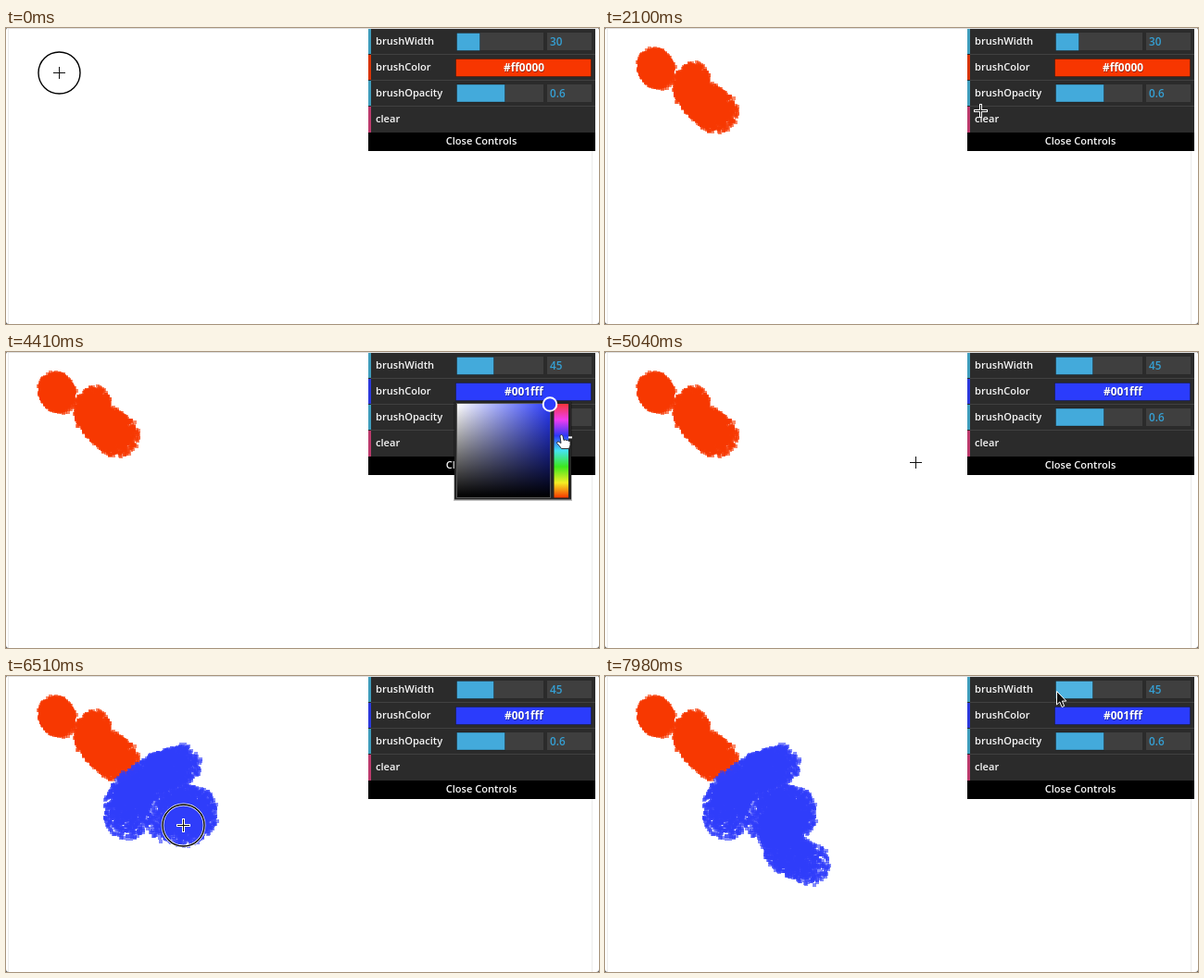
These frames come from a looping animation (640 px wide and 320 px high, 8 s). An HTML page with a canvas:

```html
<!DOCTYPE html>
<html lang="en">
<head>
<meta charset="utf-8">
<title>Brush controls</title>
<style>
html, body { margin: 0; width: 100%; height: 100%; overflow: hidden; background: #fff; }
canvas, svg { position: absolute; left: 0; top: 0; width: 640px; height: 320px; }
text { font-family: "Open Sans", "Noto Sans", sans-serif; font-weight: 600; }
.label { font-size: 11.1px; fill: #f6f6f6; }
.num { font-size: 11.7px; fill: #35a0d4; }
.hex { font-size: 11.9px; font-weight: 700; fill: #fff; text-anchor: middle; }
.rim { stroke: #000; stroke-opacity: .3; }
</style>
</head>
<body>
<canvas id="paint" width="640" height="320"></canvas>
<svg viewBox="0 0 640 320">
  <defs>
    <linearGradient id="sat">
      <stop stop-color="#fff"/><stop id="satEnd" offset="1"/>
    </linearGradient>
    <linearGradient id="dark" x2="0" y2="1">
      <stop stop-color="#000" stop-opacity="0"/><stop offset="1"/>
    </linearGradient>
    <linearGradient id="hues" x2="0" y2="1">
      <stop stop-color="#f5363a"/><stop offset=".17" stop-color="#f03cf0"/>
      <stop offset=".34" stop-color="#2d38f8"/><stop offset=".5" stop-color="#45e4f0"/>
      <stop offset=".67" stop-color="#3ce81e"/><stop offset=".84" stop-color="#f4ee24"/>
      <stop offset="1" stop-color="#f63800"/>
    </linearGradient>
  </defs>

  <g fill="none" stroke="#ececec">
    <path d="M2.5 1V320M632.5 1V320"/>
    <path d="M2 .5H638" stroke="#dedede"/>
  </g>
  <path d="M0 317Q0 320 3 320H0ZM640 317Q640 320 637 320H640ZM0 2Q0 0 2 0H0ZM640 2Q640 0 638 0H640Z" fill="#555"/>

  <g id="panel">
    <rect x="391" y="1" width="245" height="112" fill="#2b2b2b"/>
    <path d="M394 28.5H636M394 56.5H636M394 84.5H636" stroke="#414141"/>
    <rect x="391" y="113" width="245" height="20" fill="#000"/>
    <g opacity=".85">
      <rect x="391" y="1" width="3" height="27" fill="#43b1d6"/>
      <rect id="edge" x="391" y="29" width="3" height="27"/>
      <rect x="391" y="57" width="3" height="27" fill="#43b1d6"/>
      <rect x="391" y="85" width="3" height="28" fill="#d63d78"/>
    </g>
    <g class="label">
      <text x="399" y="18">brushWidth</text>
      <text x="399" y="46">brushColor</text>
      <text x="399" y="74">brushOpacity</text>
      <text x="399" y="102">clear</text>
      <text x="513" y="126" text-anchor="middle">Close Controls</text>
    </g>
    <path d="M487 5h93v19h-93ZM584 5h48v19h-48ZM487 61h93v19h-93ZM584 61h48v19h-48Z" fill="#3f3f3f"/>
    <rect id="widthFill" class="rim" x="486.5" y="5.5" height="19"/>
    <rect class="rim" x="486.5" y="61" width="52" height="19" fill="#43aadb"/>
    <text id="widthNum" class="num" x="587" y="19"></text>
    <text class="num" x="587" y="75">0.6</text>
    <rect id="swatch" class="rim" x="485.5" y="33.5" width="146" height="19"/>
    <text id="hexShade" class="hex" x="559.5" y="47.6" style="fill:#000" opacity=".4"></text>
    <text id="hex" class="hex" x="559" y="47"></text>
  </g>

  <g id="picker">
    <rect x="483" y="54" width="128" height="107" fill="#000" opacity=".25"/>
    <rect x="484" y="53" width="126" height="106.5" fill="#252525"/>
    <rect x="486" y="55" width="102" height="103" fill="#555"/>
    <rect x="487" y="56" width="100" height="101" fill="url(#sat)"/>
    <rect x="487" y="56" width="100" height="101" fill="url(#dark)"/>
    <rect x="591.5" y="56" width="15.5" height="101.5" fill="url(#hues)"/>
    <rect id="mark" x="607" width="4" height="2" fill="#fff"/>
    <circle id="knob" cx="587" cy="56.5" r="7.3" stroke="#fff" stroke-width="2"/>
  </g>

  <g id="pointer">
    <g id="ring" fill="none">
      <circle r="22.5" stroke="#fff" stroke-width="2.8"/>
      <circle r="22.5" stroke="#000" stroke-width="1.4"/>
    </g>
    <g id="cross">
      <path d="M-7.5 0H7.5M0 -7.5V7.5" stroke="#fff" stroke-width="3"/>
      <path d="M-6.5 0H6.5M0 -6.5V6.5" stroke="#111"/>
    </g>
    <g id="ibeam" fill="none">
      <path d="M-4 -8Q0 -8 0 -5V5Q0 8 -4 8M4 -8Q0 -8 0 -5V5Q0 8 4 8M-2 3H2" stroke="#fff" stroke-width="3"/>
      <path d="M-3.5 -8Q0 -8 0 -5V5Q0 8 -3.5 8M3.5 -8Q0 -8 0 -5V5Q0 8 3.5 8M-2 3H2" stroke="#222"/>
    </g>
    <path id="arrow" d="M0 0V14.5L3.3 11.5L5.6 17L8.2 16L5.9 10.6H10.3Z" fill="#111" stroke="#fff"/>
    <path id="hand" d="M-1.6 -2Q0 -4 1.4 -2L2.5 3Q4 1.6 5 3Q6.5 2 7.3 3.7Q9 3 9.5 5V8Q9 10 8 12H0Q-2 9 -5 6Q-5 4 -3 4.5L-.5 6Z" fill="#fff" stroke="#222" stroke-width=".9"/>
  </g>
</svg>
<script>
const LOOP = 8000, STEP = 70;
const UP = 0, RED = 1, BLUE = 2, IDLE = 3;
const INK = { [RED]: "#f73700", [BLUE]: "#2f3dfb" };
const $ = id => document.getElementById(id);
const ctx = $("paint").getContext("2d");

// Pointer path: time, x, y, button state until the next entry, spray radius
const path = [
  [0, 57, 48, RED, 18], [210, 53, 39, RED, 18], [350, 55, 45, RED, 19], [420, 60, 49, IDLE, 18],
  [490, 95, 54, RED, 18], [700, 93, 70, RED, 19], [880, 108, 81, RED, 22], [1150, 122, 92, UP, 23],
  [1400, 124, 94, UP], [2100, 405, 89, UP], [2380, 511, 16, UP], [2450, 511, 16, UP],
  [2700, 526, 16, UP], [2800, 545, 43, UP], [3290, 558, 66, UP], [3640, 599, 106, UP],
  [3710, 599, 106, UP], [4200, 599, 92, UP], [4480, 599, 92, UP], [4700, 480, 78, UP],
  [5040, 335, 119, UP], [5320, 191, 95, BLUE, 21], [5560, 165, 104, BLUE, 21], [5700, 138, 124, BLUE, 23],
  [5850, 129, 144, IDLE, 25], [5950, 138, 156, IDLE], [6020, 131, 151, BLUE, 25], [6090, 132, 153, IDLE, 25],
  [6180, 176, 158, BLUE, 24], [6300, 190, 141, BLUE, 25], [6400, 206, 146, BLUE, 25], [6480, 198, 158, BLUE, 25],
  [6530, 187, 164, BLUE, 23], [6580, 194, 190, BLUE, 23], [6660, 225, 205, UP, 22], [6720, 225, 205, UP],
  [7000, 572, 43, UP], [7300, 572, 43, UP], [7840, 487, 16, UP], [8000, 487, 16, UP]
];
const shapes = [
  [0, "cross"], [2150, "arrow"], [2780, "ibeam"], [2950, "hand"],
  [4620, "cross"], [6950, "ibeam"], [7350, "arrow"]
];

const clamp = v => Math.min(1, Math.max(0, v));
const mix = (a, b, k) => a + (b - a) * k;
const during = (t, a, b) => clamp((t - a) / (b - a));
const smooth = k => k * k * (3 - 2 * k);
const lastBefore = (list, t) => list.reduce((best, item) => item[0] <= t ? item : best);

function random(seed) {
  return () => {
    seed = (seed * 1664525 + 1013904223) >>> 0;
    return seed / 4294967296;
  };
}

// Every stroke is a spray of small translucent squares
function makeDots() {
  const rnd = random(71), dots = [];
  for (let i = 0; i < path.length - 1; i++) {
    const [t, x, y, ink, r1] = path[i], [t2, x2, y2, , r2] = path[i + 1];
    if (!INK[ink]) continue;
    const count = 18 * Math.hypot(x2 - x, y2 - y) + 4 * (t2 - t);
    for (let n = 0; n < count; n++) {
      const k = n / count, a = rnd() * Math.PI * 2, r = mix(r1, r2, k) * Math.sqrt(rnd());
      dots.push({
        t: mix(t, t2, k), ink,
        x: Math.round(mix(x, x2, k) + r * Math.cos(a)) - 2,
        y: Math.round(mix(y, y2, k) + r * Math.sin(a)) - 2
      });
    }
  }
  return dots;
}
const dots = makeDots();

function pointerAt(t) {
  let i = 0;
  while (i < path.length - 2 && path[i + 1][0] <= t) i++;
  const [t1, x, y, state] = path[i], [t2, x2, y2] = path[i + 1];
  const linear = during(t, t1, t2), k = state === UP ? smooth(linear) : linear;
  return { x: mix(x, x2, k), y: mix(y, y2, k), state };
}

function hueToRgb(h) {
  const part = n => {
    const k = (n + h / 60) % 6;
    return Math.round(255 * (1 - clamp(Math.min(k, 4 - k))));
  };
  return [part(5), part(3), part(1)];
}

const toHex = rgb => "#" + rgb.map(v => v.toString(16).padStart(2, "0")).join("");

// Slightly softened version of the pure colour
const screenColor = ([r, g, b]) => toHex(
  [.97 * r + .17 * b, .21 * r + .95 * g + .12 * b, .99 * b].map(v => Math.min(255, Math.round(v))));

function set(id, attrs) {
  for (const name in attrs) $(id).setAttribute(name, attrs[name]);
}
const show = (id, on) => set(id, { visibility: on ? "visible" : "hidden" });

function drawPaint(t) {
  ctx.clearRect(0, 0, 640, 320);
  ctx.globalAlpha = .6;
  for (const d of dots) {
    if (d.t >= t) break;
    ctx.fillStyle = INK[d.ink];
    ctx.fillRect(d.x, d.y, 4, 4);
  }
}

function drawPanel(t) {
  const size = Math.round(mix(30, 45, smooth(during(t, 2450, 2700))));
  const hover = (t > 2330 && t < 2740) || t > 7770;
  set("widthFill", { width: size - 5, fill: hover ? "#4fb3e1" : "#43aadb" });
  $("widthNum").textContent = size;

  const hue = t < 3710 ? 0 : mix(182, 232.7, during(t, 3710, 4200));
  const rgb = hueToRgb(hue), color = screenColor(rgb);
  for (const id of ["edge", "swatch", "knob"]) set(id, { fill: color });
  set("satEnd", { "stop-color": color });
  set("mark", { y: 156 - hue / 3.6 });
  $("hex").textContent = $("hexShade").textContent = toHex(rgb);
  show("picker", (t >= 2780 && t < 4640) || (t >= 6900 && t < 7400));
}

function drawPointer(t) {
  const p = pointerAt(t), shape = lastBefore(shapes, t)[1];
  const snap = v => Math.floor(v) + .5;
  set("pointer", { transform: `translate(${snap(p.x)} ${snap(p.y)})` });
  for (const id of ["cross", "ibeam", "arrow", "hand"]) show(id, id === shape);
  show("ring", p.state !== UP);
}

let shown = -1;
function frame(now) {
  const t = Math.floor((now % LOOP) / STEP) * STEP;
  if (t !== shown) {
    shown = t;
    drawPaint(t);
    drawPanel(t);
    drawPointer(t);
  }
  requestAnimationFrame(frame);
}
frame(0);
</script>
</body>
</html>
```
